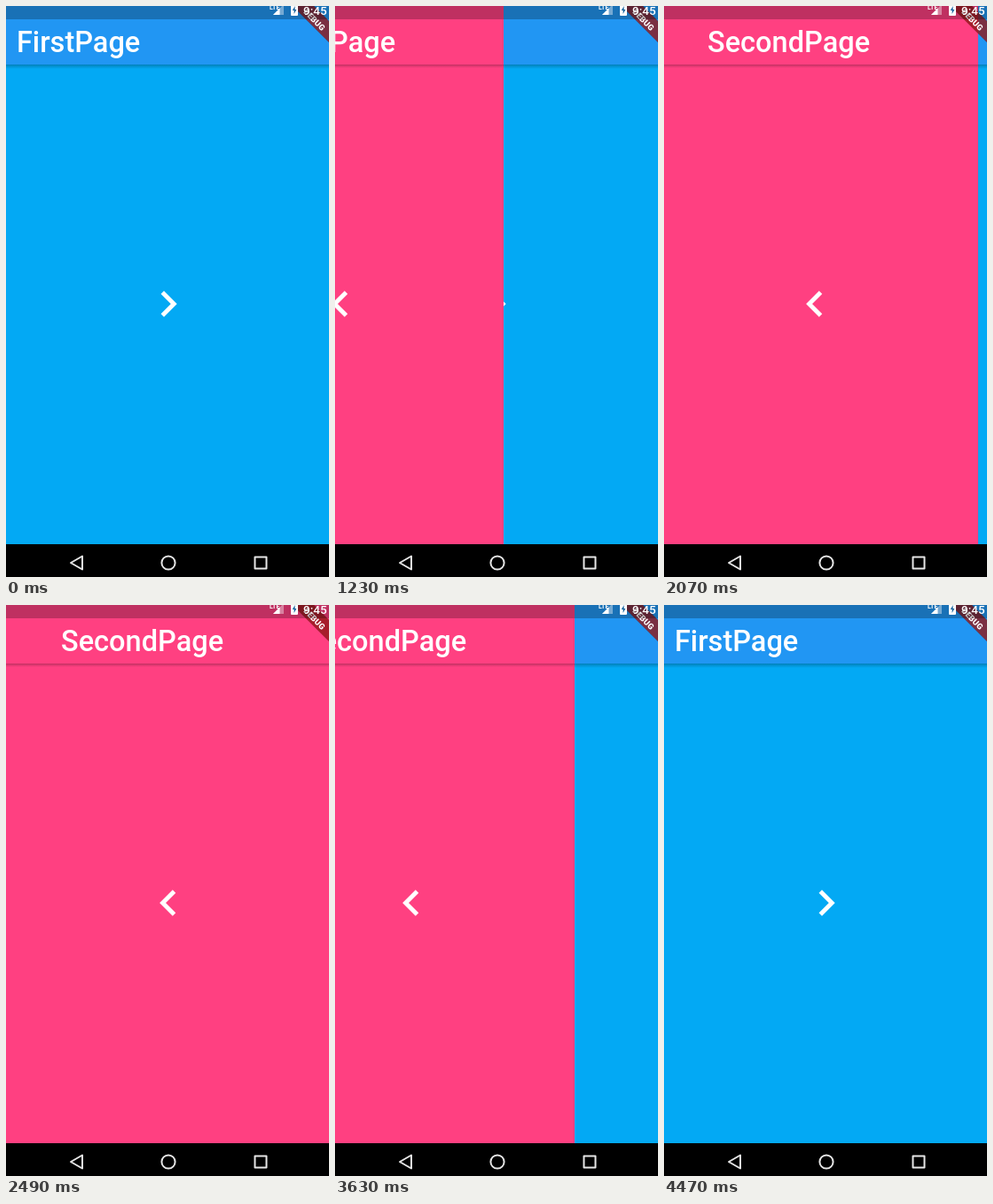
Write an HTML page that moves like this. It is 364 px wide and 644 px high and loops after 5.04 s.

```html
<!DOCTYPE html>
<html lang="en">
<head>
<meta charset="utf-8">
<title>Page slide</title>
<style>
  html, body { margin: 0; width: 100%; height: 100%; overflow: hidden; background: #000; }
  svg { display: block; width: 100vw; height: 100vh; }
  text { font-family: Roboto, sans-serif; fill: #fff; }
  .title { font-size: 32.5px; font-weight: 500; }
</style>
</head>
<body>
<svg viewBox="0 0 364 644">
  <defs>
    <linearGradient id="shade" x2="0" y2="1">
      <stop offset="0" stop-opacity=".24"/>
      <stop offset="1" stop-opacity="0"/>
    </linearGradient>
  </defs>

  <g id="first">
    <rect width="367" height="607" fill="#03a9f4"/>
    <rect y="66" width="367" height="5" fill="url(#shade)"/>
    <rect width="367" height="66" fill="#2196f3"/>
    <text class="title" x="12" y="52">FirstPage</text>
    <path transform="translate(153.5 306.6) scale(2.45)" fill="#fff"
      d="M10 6 8.59 7.41 13.17 12l-4.58 4.59L10 18l6-6z"/>
  </g>

  <g id="second">
    <rect width="367" height="607" fill="#ff4081"/>
    <rect y="66" width="367" height="4" fill="url(#shade)"/>
    <rect width="367" height="66" fill="#ff4081"/>
    <text class="title" x="62" y="52">SecondPage</text>
    <path transform="translate(153.5 306.6) scale(2.45)" fill="#fff"
      d="M15.41 7.41 14 6l-6 6 6 6 1.41-1.41L10.83 12z"/>
  </g>

  <g id="banner">
    <path d="M323 0H347L364 17V41z" fill-opacity=".45"/>
    <path d="M323 0H347L364 17V41z" fill="#b71c1c" fill-opacity=".63"/>
    <text transform="translate(347.5 15.5) rotate(45)" y="3.3" font-size="9.3"
      font-weight="900" text-anchor="middle">DEBUG</text>
  </g>

  <g id="status">
    <rect width="364" height="15" fill-opacity=".25"/>
    <text x="297" y="4" font-size="7" font-weight="700">LTE</text>
    <path d="M313 -2V10H301z" fill="#fff" fill-opacity=".4"/>
    <path d="M308.500 2.500V10H301z" fill="#fff"/>
    <rect x="321" y="-2" width="8" height="13" rx="1" fill="#fff"/>
    <path d="M325.600 0 322.800 5h1.800v4l2.800-5h-1.800z" fill="#19659f"/>
    <text x="335" y="9.500" font-size="13.500" font-weight="500">9:45</text>
  </g>

  <g id="nav">
    <rect y="607" width="364" height="37"/>
    <g fill="none" stroke="#e6e6e6" stroke-width="2" stroke-linejoin="round">
      <path d="M86 620.500V635.500L73 628z"/>
      <circle cx="183" cy="628" r="7.600"/>
      <rect x="280.500" y="621.500" width="13" height="13"/>
    </g>
  </g>
</svg>
<script>
const LOOP = 5040, STEP = 30, WIDTH = 367;
const OPEN = { start: 495, length: 2060 };
const CLOSE = { start: 2625, length: 1900 };
const second = document.getElementById('second');

const clamp = v => Math.min(1, Math.max(0, v));
const progress = (t, { start, length }) => clamp((t - start) / length);

// cubic-bezier(.4, 0, .2, 1), solved by bisection
function ease(x) {
  if (x <= 0 || x >= 1) return clamp(x);
  let lo = 0, hi = 1, s;
  for (let i = 0; i < 24; i++) {
    s = (lo + hi) / 2;
    const r = 1 - s;
    const bx = 1.2 * s * r * r + 0.6 * s * s * r + s * s * s;
    if (bx < x) lo = s; else hi = s;
  }
  return s * s * (3 - 2 * s);
}

function draw(ms) {
  const t = Math.floor((ms % LOOP) / STEP) * STEP;
  const p = t < CLOSE.start ? progress(t, OPEN) : 1 - progress(t, CLOSE);
  const edge = Math.round(WIDTH * ease(p));
  second.setAttribute('transform', `translate(${edge - WIDTH} 0)`);
  second.setAttribute('visibility', edge > 1 ? 'visible' : 'hidden');
}

const begin = performance.now();
function tick() {
  draw(performance.now() - begin);
  requestAnimationFrame(tick);
}
tick();
</script>
</body>
</html>
```
